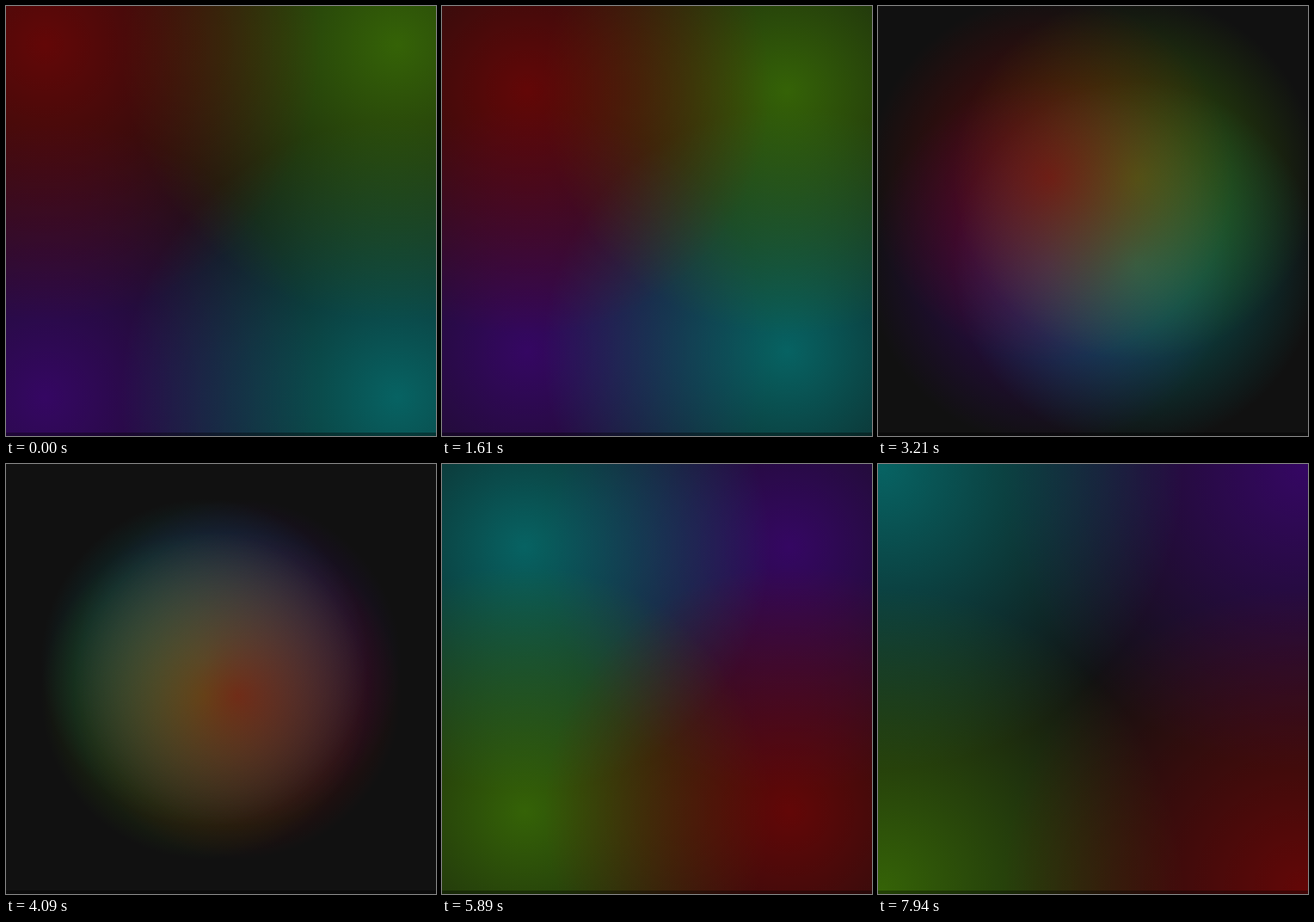
Write an HTML page that moves like this. It is 500 px wide and 500 px high and loops after 8 s.

```html
<!DOCTYPE html>
<html lang="en">
<head>
<meta charset="utf-8">
<title>Drifting colour glows</title>
<style>
  html, body {
    margin: 0;
    width: 100%;
    height: 100%;
    overflow: hidden;
    background: #111;
  }
  .stage {
    --near: 9%;
    --far: 91%;
    position: relative;
    width: 100%;
    height: 100%;
    background:
      radial-gradient(circle at var(--near) var(--near), hsla(0, 100%, 30%, .6), transparent 50%),
      radial-gradient(circle at var(--far) var(--near), hsla(90, 100%, 30%, .6), transparent 50%),
      radial-gradient(circle at var(--far) var(--far), hsla(180, 100%, 30%, .6), transparent 50%),
      radial-gradient(circle at var(--near) var(--far), hsla(270, 100%, 30%, .6), transparent 50%),
      #111;
  }
  /* thin shaded edge along the bottom */
  .stage::after {
    content: "";
    position: absolute;
    inset: auto 0 0;
    height: 4px;
    background: rgba(0, 0, 0, .35);
  }
</style>
</head>
<body>
<div class="stage"></div>
<script>
  const LOOP = 8000, FIRST = 120, LAST = 7940, STEP = (LAST - FIRST) / 79;
  const FROM = 9, TO = 99;
  const stage = document.querySelector('.stage');

  const bezier = (s, a, b) => 3 * (1 - s) ** 2 * s * a + 3 * (1 - s) * s * s * b + s ** 3;

  function ease(x) {
    let lo = 0, hi = 1;
    for (let i = 0; i < 30; i++) {
      const mid = (lo + hi) / 2;
      if (bezier(mid, .38, .66) < x) lo = mid; else hi = mid;
    }
    return bezier(lo, .1, .9);
  }

  // The picture advances in steps of roughly a tenth of a second.
  function snap(t) {
    return t < FIRST ? 0 : FIRST + Math.floor((t - FIRST) / STEP + .001) * STEP;
  }

  const start = performance.now();

  function draw() {
    const t = snap((performance.now() - start) % LOOP);
    const pos = FROM + (TO - FROM) * ease(t / LAST);
    stage.style.setProperty('--near', pos + '%');
    stage.style.setProperty('--far', 100 - pos + '%');
    requestAnimationFrame(draw);
  }
  draw();
</script>
</body>
</html>
```
